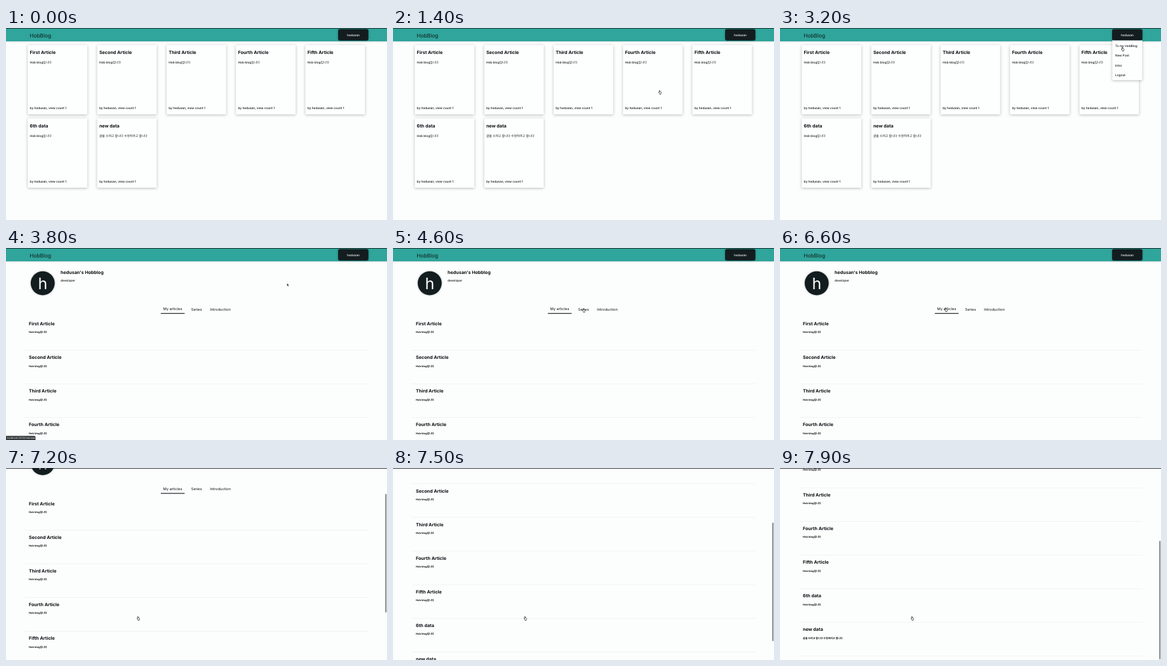
An HTML page for the animation above (8000 ms loop, 600 px wide and 303 px high).

```html
<!DOCTYPE html>
<html lang="ko">
<head>
<meta charset="utf-8">
<title>HobBlog</title>
<style>
html, body { margin: 0; width: 100%; height: 100%; overflow: hidden; background: #fcfdfd; }
svg { display: block; width: 100%; height: 100%; }
text {
  font: 500 4.8px Inter, "Noto Sans CJK KR", "Noto Sans CJK", sans-serif;
  fill: #0c0f12; text-rendering: geometricPrecision; white-space: pre;
}
.title { font-size: 7.15px; font-weight: 700; }
.small { font-size: 4px; font-weight: 700; }
.logo { font-size: 8.4px; font-weight: 400; fill: #10201d; }
.tab { font-size: 5.75px; font-weight: 400; text-anchor: middle; }
.user { fill: #fff; text-anchor: middle; }
.letter { font-size: 25px; font-weight: 400; fill: #fff; text-anchor: middle; }
.url { font-size: 3.9px; font-weight: 400; fill: #e8ebeb; }
.card { fill: #fdfefe; filter: drop-shadow(0 1.2px 2px rgba(0,0,0,.27)); }
.top { fill: #2fa59b; filter: drop-shadow(0 .8px 1.4px rgba(0,0,0,.25)); }
.dark { fill: #131d1f; filter: drop-shadow(0 .8px 1.5px rgba(0,0,0,.3)); }
.hide { display: none; }
</style>
</head>
<body>
<svg id="stage" viewBox="0 0 600 303" preserveAspectRatio="none"></svg>
<script>
const USER = 'hedusan', SITE = 'HobBlog', LOOP = 8000, STEP = 100;
const TAB_W = 37.5, MAX_SCROLL = 183.2;
const tabs = ['My articles', 'Series', 'Introduction'];
const notes = ['', '시리즈 기능을 준비 중입니다', '소개 기능을 준비 중입니다'];
const posts = [...['First', 'Second', 'Third', 'Fourth', 'Fifth'].map(n => n + ' Article'), '6th data', 'new data']
  .map(title => ({ title, body: title === 'new data' ? '글을 쓰려고 합니다 수정하려고 합니다' : 'Hob blog입니다' }));

const text = (x, y, str, cls = '', id = '') => `<text x="${x}" y="${y}" class="${cls}" id="${id}">${str}</text>`;
const rect = (x, y, w, h, attr) => `<rect x="${x}" y="${y}" width="${w}" height="${h}" ${attr}/>`;
const group = (id, body) => `<g id="${id}">${body}</g>`;

const feed = posts.map((p, i) => {
  const x = 34.3 + (i % 5) * 109.3, y = 27 + Math.floor(i / 5) * 115.7;
  return rect(x, y, 93.8, 109.3, 'class="card"')
    + text(x + 3.3, y + 13.9, p.title, 'title')
    + text(x + 3.3, y + 28.8, p.body)
    + text(x + 3.3, y + 100.8, `by ${USER}, view count 1`);
}).join('');

const list = posts.map((p, i) => {
  const y = 122 + i * 53.1;
  return text(36, y, p.title, 'title')
    + text(36, y + 12.4, p.body, 'small')
    + rect(29.5, y + 39, 541, .5, 'fill="#e4e7e8"');
}).join('');

const profile = '<circle cx="57.8" cy="55.6" r="18.9" class="dark"/>'
  + text(57.9, 65, USER[0], 'letter')
  + text(86, 40.9, `${USER}'s Hobblog`, 'title')
  + text(86, 53.3, 'developer')
  + tabs.map((name, i) => text(262.5 + i * TAB_W, 98.4, name, 'tab', 'tab' + i)).join('')
  + rect(243.8, 102.7, TAB_W, 1.2, 'id="line" fill="#1d2426"');

const header = rect(0, 0, 600, 21, 'class="top"')
  + text(37.2, 14.5, SITE, 'logo')
  + rect(523, 1.7, 47.7, 18.1, 'rx="2.8" class="dark"')
  + text(546.9, 12.9, USER, 'user');

const menu = rect(523.3, 19.6, 47.2, 62.6, 'class="card"')
  + ['To my ' + SITE, 'New Post', 'Intro', 'Logout'].map((s, i) => text(528, 29.5 + i * 15.6, s)).join('');

const status = '<path d="M0 296.6H44.5Q46.5 296.6 46.5 298.6V303H0Z" fill="#34393b"/>'
  + text(1.6, 301.2, 'localhost:3000/' + USER, 'url');

const hand = '<path d="M1.3 3.6V.9Q1.3.3 1.8.3T2.3.9V2.4L4 2.8Q4.6 3 4.5 3.7L4 5.2V6.3H1.7V5.4L.4 3.8Q.1 3.2.6 3.1Z" fill="#fff" stroke="#1a1a1a" stroke-width=".7"/>';
const arrow = '<path d="M0 0V4.3L.95 3.5L1.6 5.1L2.4 4.8L1.75 3.2H3Z" fill="#111" stroke="#fff" stroke-width=".25"/>';

const $ = id => document.getElementById(id);
$('stage').innerHTML = rect(0, 0, 600, 303, 'fill="#fcfdfd"')
  + group('page',
      group('feed', feed)
      + group('blog', profile + group('list', list) + text(29.6, 112.9, '', '', 'note'))
      + header)
  + group('menu', menu)
  + group('status', status)
  + rect(597.2, 0, 2.1, 187, 'id="bar" rx="1" fill="#858989"')
  + rect(0, 0, 600, .9, 'fill="#1b2122"')
  + group('cursor', group('hand', hand) + group('arrow', arrow));

// The pointer eases to each stop: from, to, x, y
const stops = [
  [100, 300, 141, 166], [400, 700, 297, 190], [800, 1200, 411, 103], [1300, 2000, 538, 15],
  [2800, 3200, 537.3, 30], [3400, 4330, 298, 95], [5200, 5500, 348, 95], [5900, 6400, 259, 94],
  [6800, 7100, 206, 234]
];

const progress = (t, from, to) => Math.min(1, Math.max(0, (t - from) / (to - from)));
const smooth = f => f * f * (3 - 2 * f);
const scrollAt = t => MAX_SCROLL * (1 - (1 - progress(t, 7000, 7900)) ** 1.685);

function pointerAt(t) {
  let x = 60, y = 20;
  for (const [from, to, toX, toY] of stops) {
    const f = smooth(progress(t, from, to));
    x += (toX - x) * f;
    y += (toY - y) * f;
  }
  return [x, y];
}

const show = (id, on) => $(id).classList.toggle('hide', !on);

function draw(t) {
  const home = t < 3600;
  const tab = t < 4800 || t >= 6500 ? 0 : t < 5700 ? 1 : 2;
  const top = scrollAt(t);
  show('feed', home);
  show('blog', !home);
  show('menu', t >= 2900 && home);
  show('status', t >= 3300 && t < 4000);
  show('list', tab === 0);
  $('note').textContent = notes[tab];
  tabs.forEach((_, i) => $('tab' + i).setAttribute('y', i === tab ? 97.9 : 98.5));
  $('line').setAttribute('x', 243.8 + tab * TAB_W);
  $('page').setAttribute('transform', `translate(0 ${-top})`);
  show('bar', top > 0);
  $('bar').setAttribute('y', 2 + top * .617);

  const [x, y] = pointerAt(t);
  const link = home ? x < 238 || y < 136 : y > 110 || (y > 88 && x > 240 && x < 357);
  show('cursor', t >= 200);
  show('hand', link);
  show('arrow', !link);
  $('cursor').setAttribute('transform', `translate(${x} ${y})`);
}

const start = performance.now();
function tick() {
  const t = (performance.now() - start) % LOOP;
  draw(Math.floor(t / STEP) * STEP);
  requestAnimationFrame(tick);
}
tick();
</script>
</body>
</html>
```
